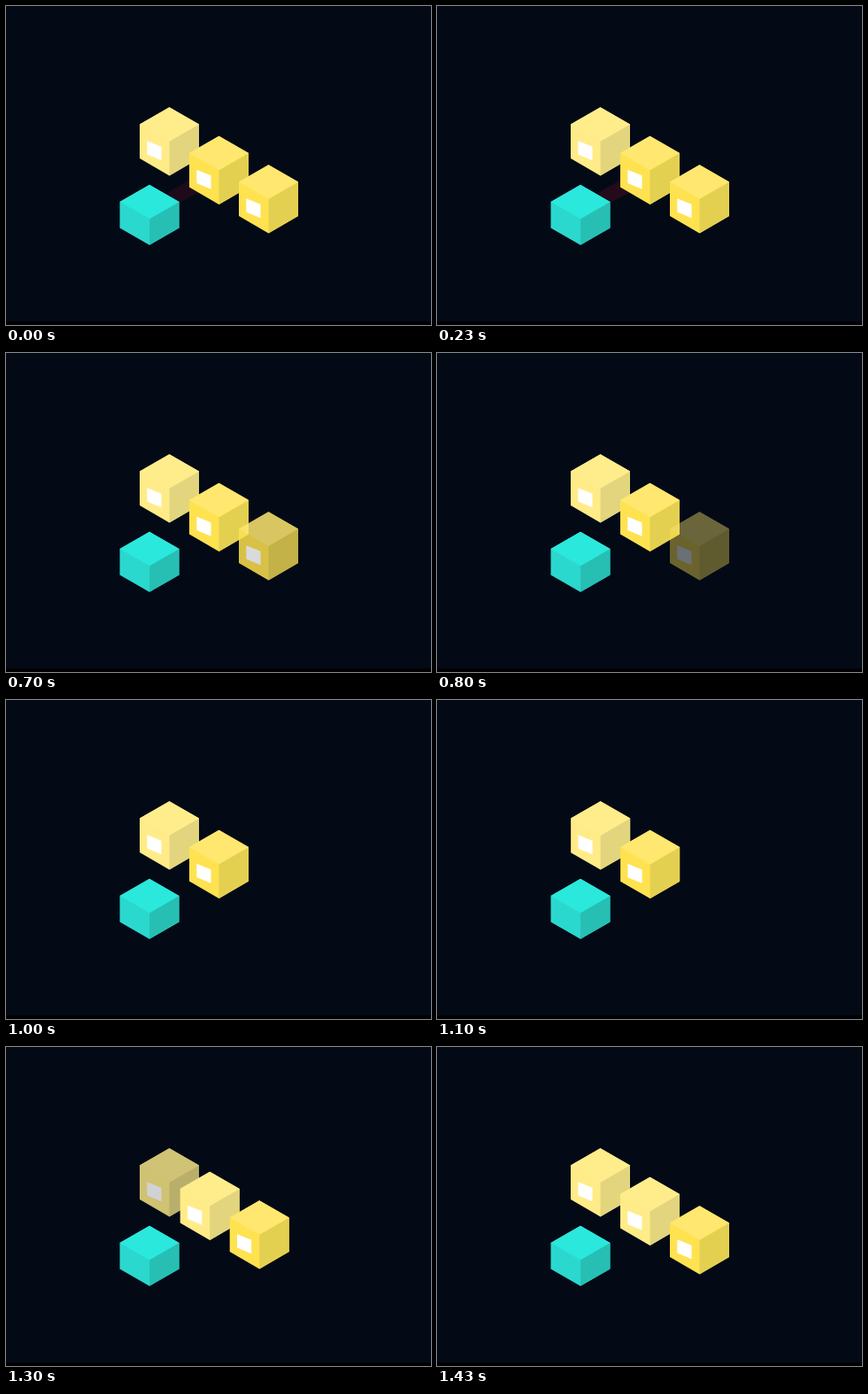
An HTML page with a canvas for the animation above (1460 ms loop, 480 by 360 pixels).

```html
<!DOCTYPE html>
<html lang="en">
<head>
<meta charset="utf-8">
<title>Scanned boxes</title>
<style>
  html, body { margin: 0; width: 100%; height: 100%; overflow: hidden; background: #030a16; }
  canvas { display: block; }
</style>
</head>
<body>
<canvas id="stage" width="480" height="360"></canvas>
<script>
const LOOP = 1460;
const HALF = 33.5;   // half width of a cube
const RISE = 19.3;   // half height of a cube's top face
const STEP = { x: 56, y: 32.5 };
const START = { x: 184.5, y: 114.2 };

const PALE = { top: '#ffed8b', left: '#ffec88', right: '#e2d57e' };
const BRIGHT = { top: '#ffe770', left: '#ffe250', right: '#e4d050' };
const SCANNER = { top: '#2ae8dc', left: '#2bd8ce', right: '#27bfb4' };

const stage = document.getElementById('stage');
const ctx = stage.getContext('2d');
const layer = document.createElement('canvas');
layer.width = stage.width;
layer.height = stage.height;
const layerCtx = layer.getContext('2d');

const progress = (t, from, to) => Math.min(1, Math.max(0, (t - from) / (to - from)));
const easeInOut = p => p < 0.5 ? 4 * p ** 3 : 1 - 4 * (1 - p) ** 3;

function polygon(c, color, points) {
  c.fillStyle = color;
  c.beginPath();
  points.forEach(([x, y]) => c.lineTo(x, y));
  c.closePath();
  c.fill();
}

function cube(c, x, y, height, colors) {
  const side = y + RISE, mid = y + 2 * RISE;
  const l = x - HALF, r = x + HALF;
  // The full outline goes first so that no seams show between faces.
  polygon(c, colors.left, [[x, y], [r, side], [r, side + height],
    [x, mid + height], [l, side + height], [l, side]]);
  polygon(c, colors.right, [[x, mid], [r, side], [r, side + height], [x, mid + height]]);
  polygon(c, colors.top, [[x, y], [r, side], [x, mid], [l, side]]);
}

function box(c, slot, colors) {
  const x = START.x + slot * STEP.x;
  const y = START.y + slot * STEP.y;
  cube(c, x, y, 38.6, colors);
  polygon(c, '#fff', [[x - 25.2, y + 38], [x - 9, y + 44.6],
    [x - 9, y + 60], [x - 25.2, y + 53.4]]);
}

function fadedBox(slot, colors, alpha) {
  if (alpha <= 0) return;
  layerCtx.clearRect(0, 0, layer.width, layer.height);
  box(layerCtx, slot, colors);
  ctx.globalAlpha = alpha;
  ctx.drawImage(layer, 0, 0);
  ctx.globalAlpha = 1;
}

function beam(t) {
  const strength = 0.1 + 0.03 * Math.sin(Math.PI * t / 400);
  ctx.globalAlpha = strength * (1 - progress(t, 430, 530));
  polygon(ctx, '#ff1440', [[180, 212], [210, 195], [226, 206], [194, 223]]);
  ctx.globalAlpha = 1;
}

function draw(t) {
  const leave = easeInOut(progress(t, 530, 1040));
  const shift = easeInOut(progress(t, 1070, 1430));

  ctx.fillStyle = '#030a16';
  ctx.fillRect(0, 0, 480, 360);
  ctx.fillStyle = '#000';
  ctx.fillRect(0, 356, 480, 4);

  beam(t);
  cube(ctx, 162, 201.7, 29.4, SCANNER);

  fadedBox(0, PALE, shift);
  box(ctx, shift, PALE);
  box(ctx, 1 + shift, BRIGHT);
  fadedBox(2, BRIGHT, 1 - leave);
}

function tick() {
  draw(performance.now() % LOOP);
  requestAnimationFrame(tick);
}
tick();
</script>
</body>
</html>
```
